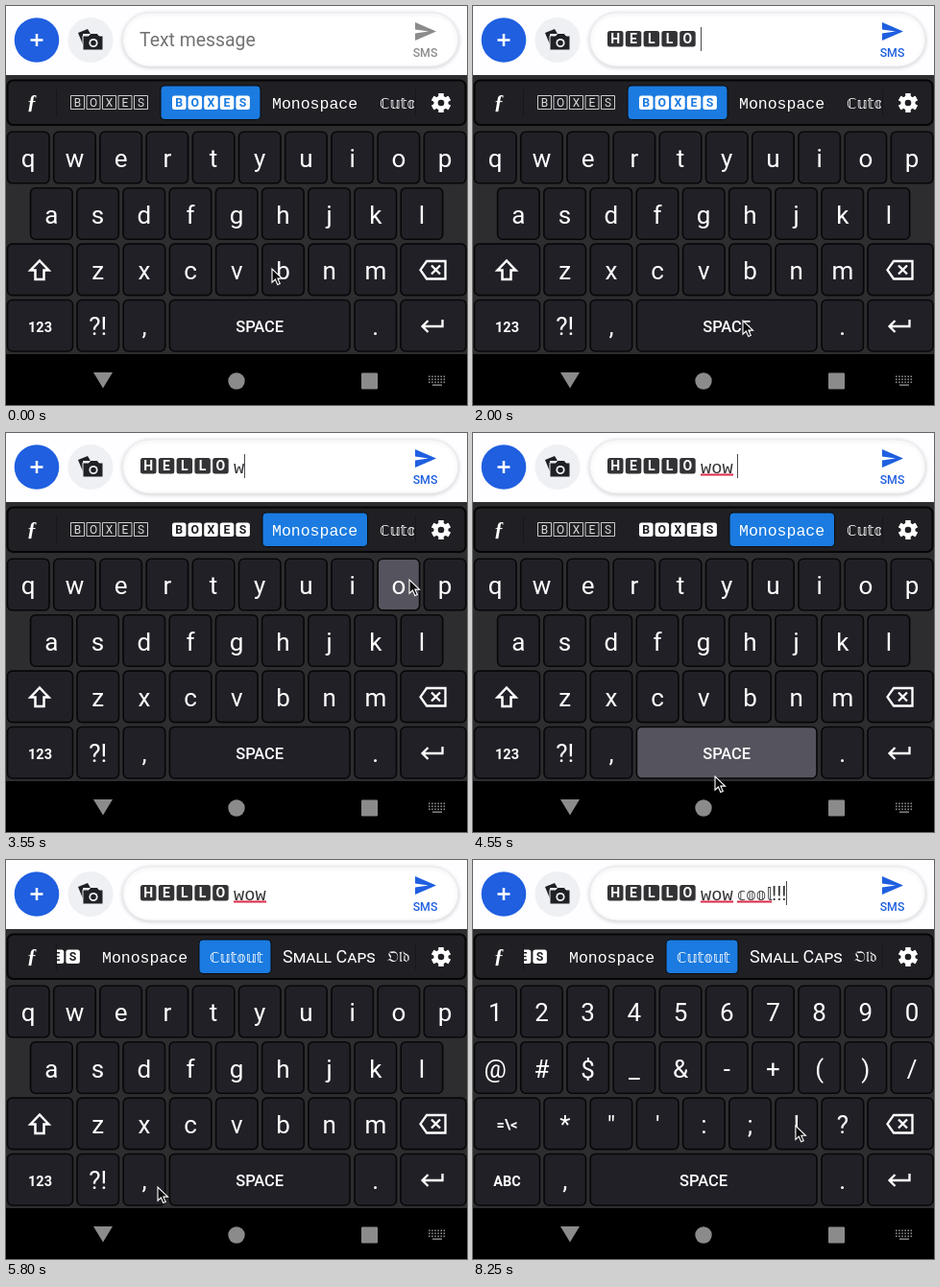
Write an HTML page with a canvas that moves like this. It is 480 px wide and 416 px high and loops after 8.3 s.

```html
<!DOCTYPE html>
<html lang="en">
<head>
<meta charset="utf-8">
<title>Font keyboard</title>
<style>
html, body { margin: 0; width: 100%; height: 100%; overflow: hidden; background: #fff; }
canvas { display: block; }
</style>
</head>
<body>
<canvas id="stage" width="480" height="416"></canvas>
<script>
const c = document.getElementById('stage').getContext('2d');
const LOOP = 8300, STEP = 50;
const BLUE = '#1b7be0', ACCENT = '#1f5fe0', INK = '#333336', DARK = '#201f24';
const KEY = '#222027', PRESSED = '#55535d', RED = '#dc2846', GRAY = '#8b8b8b';
const SANS = 'Roboto, sans-serif', MONO = '"Liberation Mono", monospace';
const SERIF = '"Liberation Serif", serif', MATH = '"DejaVu Sans", sans-serif';
const SHOWN = { mono: 2700, cutout: 5500, symbols: 7500 };

// Keyboard layouts
const PITCH = 48.2, KEY_W = 43.5;
const layouts = [
  ['qwertyuiop', 'asdfghjkl', 'zxcvbnm', ['?!', ','], 'shift', '123'],
  ['1234567890', '@#$_&-+()/', '*"\':;!?', [','], '=\\<', 'ABC']
].map(([top, middle, low, left, mode, swap]) => {
  const keys = [];
  const add = (label, x, r, w, small) => keys.push({ label, x, y: 131.3 + r * 58.4, w, small });
  const row = (labels, x, r) => [...labels].forEach((label, i) => add(label, x + i * PITCH, r, KEY_W));
  const wide = (label, x, r, w = 68) => add(label, x, r, w, true);
  row(top, 1.5, 0);
  row(middle, 1.5 + (10 - middle.length) * PITCH / 2, 1);
  wide(mode, 1.5, 2);
  row(low, 74, 2);
  wide('back', 411, 2);
  wide(swap, 1.5, 3);
  row(left, 74, 3);
  const spaceLeft = 74 + left.length * PITCH;
  wide('SPACE', spaceLeft, 3, 358 - spaceLeft);
  row('.', 363, 3);
  wide('enter', 411, 3);
  return keys;
});

// Keystrokes and the times at which they take effect
const times = [100, 1100, 1450, 1550, 1750, 1950, 3250, 3600, 4100, 4550,
  6200, 6600, 6750, 7050, SHOWN.symbols, 8000, 8100, 8200];
const strokes = [...'hello', 'SPACE', ...'wow', 'SPACE', ...'cool', '123', ...'!!!']
  .map((label, i) => ({ label, time: times[i] }));
const typed = strokes.filter(s => s.label !== '123');

// Pointer stops off the keys (time, x, y); they override nearby keystrokes
const points = [
  [0, 277, 274], [100, 283, 237], [250, 283, 237], [2000, 281, 328], [2300, 298, 214],
  [2650, 325, 103], [2750, 325, 103], [3550, 420, 153], [4400, 255, 366], [4550, 252, 358],
  [4900, 390, 103], [5100, 349, 103], [5350, 349, 103], [5500, 240, 103], [5800, 158, 341],
  [5900, 160, 366], [7250, 202, 301], [7900, 335, 277], [LOOP, 335, 277]
];
const stops = strokes
  .filter(s => points.every(p => Math.abs(p[0] - s.time) > 150))
  .flatMap(({ label, time }) => {
    const { x, y, w } = layouts.flat().find(k => k.label === label);
    return [time - STEP, time].map(t => [t, x + w / 2 + 4, y + 30]);
  })
  .concat(points)
  .sort((a, b) => a[0] - b[0]);

function pointer(t) {
  const i = stops.findIndex(p => p[0] > t);
  const [t0, x0, y0] = stops[i - 1], [t1, x1, y1] = stops[i];
  const u = (t - t0) / (t1 - t0), e = u * u * (3 - 2 * u);
  return [x0 + (x1 - x0) * e, y0 + (y1 - y0) * e];
}

// Drawing helpers
function text(s, x, y, font, color = '#fff', align = 'left') {
  c.font = font;
  c.fillStyle = color;
  c.textAlign = align;
  c.fillText(s, x, y);
  return c.measureText(s).width;
}

function rect(x, y, w, h, fill) {
  c.fillStyle = fill;
  c.fillRect(x, y, w, h);
}

function box(x, y, w, h, r, fill, line, width = 1) {
  c.beginPath();
  c.roundRect(x, y, w, h, r);
  if (fill) { c.fillStyle = fill; c.fill(); }
  if (line) { c.strokeStyle = line; c.lineWidth = width; c.stroke(); }
}

function disc(x, y, r, fill) {
  c.beginPath();
  c.arc(x, y, r, 0, 7);
  c.fillStyle = fill;
  c.fill();
}

function shape(d, fill, line, width = 2) {
  const p = new Path2D(d);
  if (fill) { c.fillStyle = fill; c.fill(p); }
  if (line) { c.strokeStyle = line; c.lineWidth = width; c.stroke(p); }
}

function boxed(word, x, y, size, pitch, fill, ink, line) {
  [...word].forEach((ch, i) => {
    const left = x + i * pitch;
    box(left, y, size, size, line ? 0 : 2.5, fill, line);
    text(ch, left + size / 2, y + size * .81, `${line ? 400 : 700} ${size * .85}px ${SANS}`, ink, 'center');
  });
}

function messageBar(t) {
  rect(0, 0, 480, 72, '#fefdff');
  disc(32, 35.5, 23.3, ACCENT);
  shape('M32 29V42M25.5 35.5H38.5', null, '#fff', 2.5);
  disc(88, 35.5, 23.5, '#eef0f3');
  shape('M75 28L85 24L88 29H80V40Z', '#202124');
  shape('M82 31H86L88 28.5H95L97 31H101V46H80V31Z', '#202124', '#eef0f3', 1);
  disc(91, 38.5, 4.6, '#eef0f3');
  disc(91, 38.5, 2.8, '#202124');

  c.save();
  c.shadowColor = 'rgba(0,0,0,.17)';
  c.shadowBlur = 4;
  c.shadowOffsetY = 1;
  box(121.5, 7, 349.5, 56, 28, '#fff', '#ebecef');
  c.restore();

  const color = t >= typed[0].time ? ACCENT : GRAY;
  shape('M426 17L448 26.5L426 36V28.5L440 26.5L426 24.5Z', color);
  text('SMS', 436.5, 52.5, `500 12.3px ${SANS}`, color, 'center');
  message(t);
}

function message(t) {
  const n = typed.filter(s => s.time <= t).length;
  if (!n) {
    text('Text message', 139, 42, `19.4px ${SANS}`, '#737373');
    return;
  }
  boxed('HELLO'.slice(0, n), 140, 26, 16.5, 18.8, INK, '#fff');
  let caret = n > 5 ? 237 : 140 + 18.7 * n;
  if (n > 6) caret += text('wow'.slice(0, n - 6), 237, 42, `18.7px ${MONO}`, INK);
  if (n > 9) {
    caret = 275;
    rect(237, 42.5, 34, 2, RED);
  }
  if (n > 10) caret += text([...'𝕔𝕠𝕠𝕝'].slice(0, n - 10).join(''), 275, 42, `17px ${MATH}`, INK);
  if (n > 14) {
    rect(275, 42.5, 36, 2, RED);
    caret = 311 + text('!'.repeat(n - 14), 311, 42, `20px ${SANS}`, INK);
  }
  const idle = t - typed[n - 1].time;
  if (idle % 800 < 400) rect(Math.round(caret), 22, 1, 25, '#4a4a50');
}

function fontStrip(t) {
  box(1.5, 77.5, 477, 46.5, 6, DARK, '#050506', 2);
  text('ƒ', 27, 107, `italic bold 21px ${SERIF}`, '#fff', 'center');
  c.save();
  c.translate(453, 101);
  for (let i = 0; i < 6; i++) {
    c.rotate(Math.PI / 3);
    rect(-2.5, -10, 5, 20, '#fff');
  }
  disc(0, 0, 7.6, '#fff');
  disc(0, 0, 3.3, DARK);
  c.restore();
  rect(52, 87, 1, 28, '#17161a');
  rect(426, 87, 1, 28, '#17161a');

  const flick = Math.min(1, Math.max(0, (t - 4950) / 400));
  const [left, width] = t < SHOWN.mono ? [161, 104] : t < SHOWN.cutout ? [267, 109.5] : [378, 75];
  c.save();
  c.beginPath();
  c.rect(53, 78, 372, 46);
  c.clip();
  c.translate(-177 * (1 - (1 - flick) ** 2), 0);
  box(left, 83, width, 35.5, 4, BLUE, '#0b0b0d');
  boxed('BOXES', 67.5, 93.5, 14, 16.5, null, '#ddd', '#ccc');
  boxed('BOXES', 173, 93.5, 14.5, 16.6, '#fff', t < SHOWN.mono ? BLUE : DARK);
  text('Monospace', 277, 107, `16.5px ${MONO}`);
  text('ℂ𝕦𝕥𝕠𝕦𝕥', 389, 106.5, `15px ${MATH}`);
  text('Small Caps', 465, 107, `small-caps 18px ${SANS}`);
  text('𝔒𝔩𝔡', 574, 106, `16px ${MATH}`);
  c.restore();
}

const icons = {
  shift: () => shape('M35 265.5L44.5 275.5H39.5V285H30.5V275.5H25.5Z', null, '#fff', 2.5),
  back: () => shape('M438 266H457.5V284.5H438L431.5 275.2ZM443 270.5L452 279.5M452 270.5L443 279.5', null, '#fff', 2.3),
  enter: () => shape('M454.5 327V334H434M439.5 328L433.5 334L439.5 340', null, '#fff', 2.3)
};

function keyboard(t) {
  rect(0, 72, 480, 291, '#2d2c2f');
  fontStrip(t);
  const down = strokes.find(s => t >= s.time - STEP && t <= s.time);
  for (const { label, x, y, w, small } of layouts[t < SHOWN.symbols ? 0 : 1]) {
    box(x, y, w, 53.5, 5, down?.label === label ? PRESSED : KEY, '#070708', 1.6);
    if (icons[label]) icons[label]();
    else {
      const font = !small ? '26px' : label === 'SPACE' ? '500 16.5px' : '700 14.5px';
      text(label, x + w / 2, Math.round(y + (small ? 33 : 36.8)), `${font} ${SANS}`, '#fff', 'center');
    }
  }
}

function navBar() {
  rect(0, 363, 480, 53, '#000');
  shape('M91 382H111L101 398.5Z', GRAY);
  disc(240, 391, 8.7, GRAY);
  box(370, 382.5, 17, 17, 1, GRAY);
  for (let i = 0; i < 18; i++) rect(440 + i % 6 * 3.1, 385.5 + Math.floor(i / 6) * 3, 1.6, 1.6, GRAY);
  rect(444, 394.5, 10, 1.4, GRAY);
}

function arrow(t) {
  c.save();
  c.translate(...pointer(t));
  c.scale(.92, .92);
  shape('M0 0V15.5L3.7 12L6.3 18L9 16.8L6.4 11H11.4Z', '#0a0a0a', '#fff', 1.2);
  c.restore();
}

function frame(now) {
  const t = Math.floor(now % LOOP / STEP) * STEP;
  messageBar(t);
  keyboard(t);
  navBar();
  arrow(t);
  requestAnimationFrame(frame);
}
requestAnimationFrame(frame);
</script>
</body>
</html>
```
